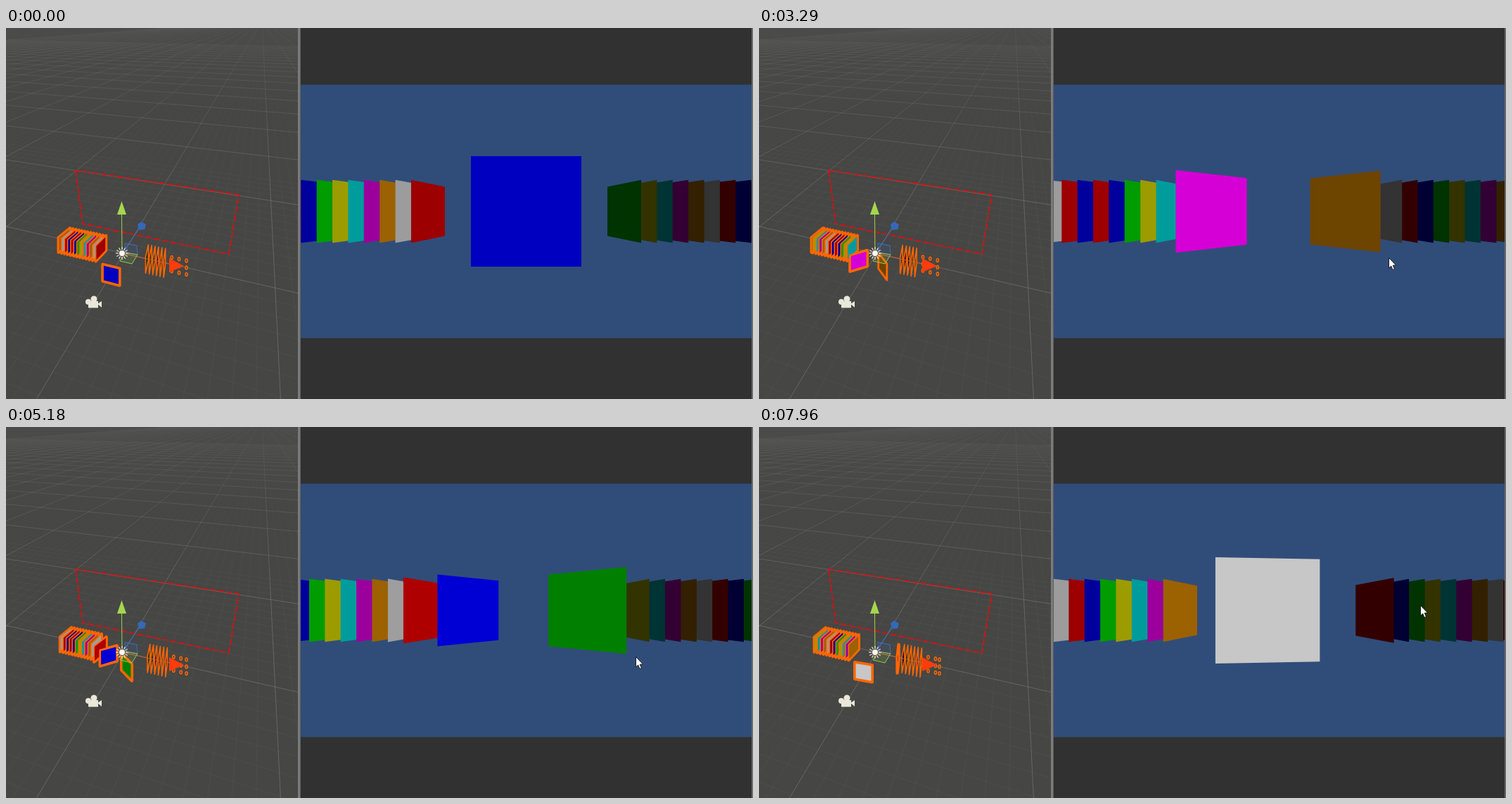
Write an HTML page with a canvas that moves like this. It is 1062x527 px and loops after 8 s.

```html
<!DOCTYPE html>
<html lang="en">
<head>
<meta charset="utf-8">
<title>Card carousel</title>
<style>
html, body { margin: 0; width: 100%; height: 100%; overflow: hidden; background: #313131; }
canvas { display: block; width: 1062px; height: 527px; }
</style>
</head>
<body>
<canvas id="stage" width="1062" height="527"></canvas>
<script>
const LOOP = 8000, LAST = 7960;
const COUNT = 26, RATE = 6 / 1000, TILT = 80 * Math.PI / 180;
const HUES = [[1, 0, 0], [0, 0, 1], [0, 1, 0], [1, 1, 0], [0, 1, 1], [1, 0, 1], [1, .62, 0], [1, 1, 1]];
const ORANGE = '#ff6600';

// Moments at which the selection moves by one card: first back, then forward.
const BACK = [1290, 1830, 2520, 3175];
const FORWARD = [3875, 4130, 4393, 4805, 5030, 5255, 5555, 5965, 6190, 6540, 7950];
const STEPS = [...BACK.map(t => [t, -1]), ...FORWARD.map(t => [t, 1])];
const START = 9;

// Pointer path: time, x, y
const POINTER = [[80, 976, 512], [270, 860, 338], [500, 860, 338], [610, 895, 326], [7770, 895, 326], [7960, 940, 253]];

const stage = document.getElementById('stage');
const ctx = stage.getContext('2d');

function path(c, pts, close = true) {
  c.beginPath();
  pts.forEach(([x, y], i) => i ? c.lineTo(x, y) : c.moveTo(x, y));
  if (close) c.closePath();
}

function shape(c, pts, fill, stroke, width = 1) {
  path(c, pts);
  if (fill) { c.fillStyle = fill; c.fill(); }
  if (stroke) { c.strokeStyle = stroke; c.lineWidth = width; c.stroke(); }
}

function line(c, pts, color, width = 1) {
  path(c, pts, false);
  c.strokeStyle = color;
  c.lineWidth = width;
  c.stroke();
}

function disc(c, x, y, r, fill) {
  c.beginPath();
  c.arc(x, y, r, 0, 7);
  c.fillStyle = fill;
  c.fill();
}

// Card motion

const wrap = d => ((d + COUNT / 2) % COUNT + COUNT) % COUNT - COUNT / 2;

function slot(offset) {
  const side = Math.sign(offset);
  return { x: side * (1.49 * Math.abs(side) + .25 * Math.abs(offset)), depth: side ? 4 : 2, turn: -side * TILT };
}

function ease(state, goal, ms) {
  const left = Math.exp(-RATE * ms), out = {};
  for (const key in goal) out[key] = goal[key] + (state[key] - goal[key]) * left;
  return out;
}

function cardAt(index, t) {
  let current = START, offset = wrap(index - current);
  let goal = slot(offset), state = goal, since = 0;
  for (const [time, move] of STEPS) {
    if (time > t) break;
    state = ease(state, goal, time - since);
    current += move;
    const next = wrap(index - current);
    goal = slot(next);
    if (Math.abs(next - offset) > 1) state = goal;
    offset = next;
    since = time;
  }
  return { ...ease(state, goal, t - since), hue: HUES[index % 8], offset };
}

function shade({ turn, hue }) {
  const light = .2 + .643 * Math.max(0, Math.cos(turn - Math.PI / 6));
  return `rgb(${hue.map(v => Math.round(v * light * 255))})`;
}

// Corners in world space, projected by the given view.
function corners({ x, depth, turn }, view, size = 1) {
  const dx = Math.cos(turn) * size / 2, dz = Math.sin(turn) * size / 2, h = size / 2;
  return [[-1, h], [1, h], [1, -h], [-1, -h]].map(([s, y]) => view(x + s * dx, y, depth + s * dz));
}

const gameView = (x, y, depth) => [739.5 + 314 * x / depth, 260.5 - 314 * y / depth];

function sceneView(x, y, depth) {
  const z = 4 - depth, w = 1 - .0128 * x - .0424 * z;
  return [167 + (18.8 * x - 8.07 * z) / w, 320 + (4.22 * x + 14 * z - 18.5 * y) / w];
}

// Static backdrop

function drawGrid(c) {
  const fade = (low, high) => {
    const g = c.createLinearGradient(0, 0, 0, 527);
    g.addColorStop(0, `rgba(165,165,165,${low})`);
    g.addColorStop(.3, `rgba(165,165,165,${low + (high - low) * .6})`);
    g.addColorStop(.5, `rgba(165,165,165,${high})`);
    g.addColorStop(1, `rgba(165,165,165,${high})`);
    return g;
  };
  const major = fade(.06, .32), minor = fade(0, .06);
  const ray = ([vx, vy], [x, y], color) => line(c, [[vx, vy], [vx + (x - vx) * 9, vy + (y - vy) * 9]], color);
  for (let i = -200; i <= 70; i++) {
    const color = i % 10 ? minor : major;
    if (i % 10 === 0 || i > -40) ray([364, -10], sceneView(i, 0, 4), color);
  }
  for (let i = -15; i <= 200; i++) {
    const color = i % 10 ? minor : major;
    if (i % 10 === 0 || i < 15) ray([-1278, -10], sceneView(0, 0, 4 + i), color);
  }
}

function makeBackdrop() {
  const layer = document.createElement('canvas');
  layer.width = 1062;
  layer.height = 527;
  const c = layer.getContext('2d');
  const rect = (x, y, w, h, color) => { c.fillStyle = color; c.fillRect(x, y, w, h); };
  const floor = c.createLinearGradient(0, 0, 0, 120);
  floor.addColorStop(0, '#4b4b4a');
  floor.addColorStop(1, '#464644');
  rect(0, 0, 415, 527, floor);
  drawGrid(c);
  rect(415, 0, 647, 527, '#313131');
  rect(415, 0, 4, 527, '#7b7b7b');
  rect(418, 0, 1, 527, '#5c5c5c');
  rect(419, 80.5, 641, 360, '#304d79');
  rect(1060, 0, 2, 527, '#6a6a6a');
  c.setLineDash([9, 3]);
  shape(c, [[99, 202], [331, 237], [317, 321], [109, 278]], null, '#ff0000', 1.4);
  return layer;
}

// Scene pane

const SCENE_CARD = 1.18;

function drawFarCard(card) {
  if (card.offset % 2) return;
  const [a, b, d, e] = corners(card, sceneView);
  for (const [p, q] of [[a, b], [a, d], [d, e]]) {
    ctx.beginPath();
    ctx.ellipse((p[0] + q[0]) / 2, (p[1] + q[1]) / 2, 1.6, 2.4, 0, 0, 7);
    ctx.strokeStyle = ORANGE;
    ctx.lineWidth = 1.5;
    ctx.stroke();
  }
}

function drawSceneCards(cards) {
  const isFar = card => card.offset > 6 && card.x > 2.9;
  const near = cards.filter(card => !isFar(card));
  cards.filter(isFar).forEach(drawFarCard);
  const outline = card => corners(card, sceneView, SCENE_CARD);
  // A shared halo around the group, then thin lines between its cards.
  near.filter(card => card.offset <= 0).forEach(card => shape(ctx, outline(card), null, ORANGE, 4.4));
  near.forEach(card => {
    const single = Math.abs(card.x) < 1.5;
    shape(ctx, outline(card), shade(card), ORANGE, single ? 2.8 : 1.6);
  });
}

function drawGizmos() {
  line(ctx, [[165, 320], [164.5, 265]], '#a0d64a');
  shape(ctx, [[158, 265], [171, 265], [164.5, 246]], '#a5d64e');
  line(ctx, [[165, 320], [190, 284]], '#3d74c8');
  shape(ctx, [[187, 279], [192, 275], [199, 279], [197, 286], [189, 287]], '#3568b8');
  line(ctx, [[165, 320], [232, 335]], '#c8603c');
  shape(ctx, [[232, 327], [253, 338], [232, 347]], '#ff3c0c');
  shape(ctx, [[169, 306], [186, 309], [187, 322], [170, 319]], 'rgba(60,110,200,.15)', '#3c6ebe');
  shape(ctx, [[162, 331], [179, 335], [187, 322], [170, 319]], 'rgba(150,210,80,.15)', '#94c850');

  for (let i = 0; i < 12; i++) {
    const a = i * Math.PI / 6, dx = Math.cos(a), dy = Math.sin(a);
    line(ctx, [[165 + 5 * dx, 320 + 5 * dy], [165 + 9 * dx, 320 + 9 * dy]], '#e8e4da', 1.2);
  }
  disc(ctx, 165, 320, 5, '#5a4a40');
  disc(ctx, 165, 320, 4, '#fffaf0');

  const cream = '#e9e8da';
  disc(ctx, 117, 389, 4, cream);
  disc(ctx, 125, 385, 4.5, cream);
  ctx.fillRect(117, 388, 14, 9.5);
  shape(ctx, [[130, 392], [136, 388], [136, 397]], cream);
}

function clipped(x, y, w, h, draw) {
  ctx.save();
  ctx.beginPath();
  ctx.rect(x, y, w, h);
  ctx.clip();
  draw();
  ctx.restore();
}

function drawPointer(t) {
  if (t < POINTER[0][0]) return;
  let i = 0;
  while (i < POINTER.length - 2 && t >= POINTER[i + 1][0]) i++;
  const [t0, x0, y0] = POINTER[i], [t1, x1, y1] = POINTER[i + 1];
  const p = Math.min(1, (t - t0) / (t1 - t0));
  ctx.save();
  ctx.translate(x0 + (x1 - x0) * p, y0 + (y1 - y0) * p);
  shape(ctx, [[.5, .5], [.5, 15], [3.7, 12], [6, 17.5], [8.5, 16.4], [6.2, 11.2], [10.5, 11]], '#ffffff', '#101010', .9);
  ctx.restore();
}

const backdrop = makeBackdrop();
const indices = [...Array(COUNT).keys()];

function draw(t) {
  const cards = indices.map(i => cardAt(i, t)).sort((a, b) => Math.abs(b.x) - Math.abs(a.x));
  ctx.drawImage(backdrop, 0, 0);
  ctx.lineJoin = 'round';
  clipped(0, 0, 415, 527, () => {
    drawSceneCards(cards);
    drawGizmos();
  });
  clipped(419, 81, 641, 360, () => cards.forEach(card => shape(ctx, corners(card, gameView), shade(card))));
  drawPointer(t);
}

const began = performance.now();
function tick() {
  draw(Math.min(LAST, (performance.now() - began) % LOOP));
  requestAnimationFrame(tick);
}
tick();
</script>
</body>
</html>
```
